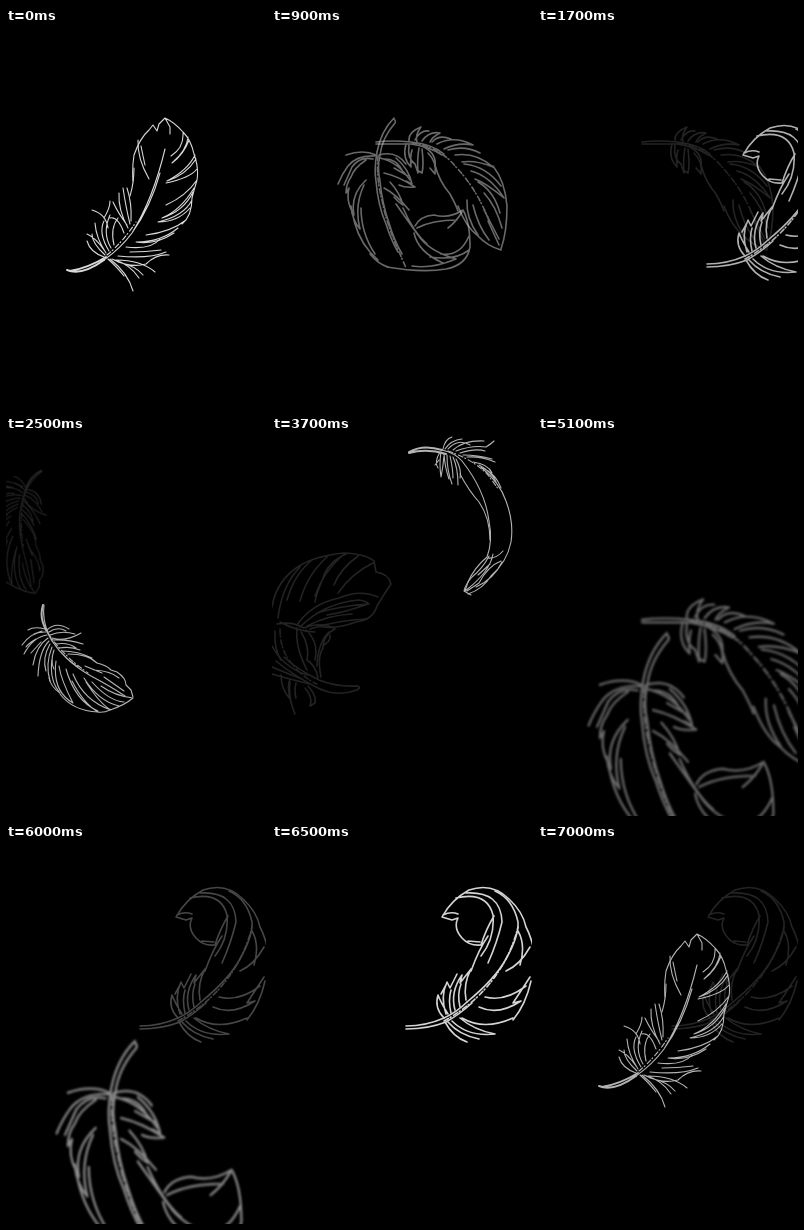
Recreate the animation shown at these times as an HTML page. Size 260x380 px, loop 7.1 s.

```html
<!DOCTYPE html>
<html lang="en">
<head>
<meta charset="utf-8">
<title>Falling feathers</title>
<style>
html, body { margin: 0; width: 100%; height: 100%; overflow: hidden; background: #000; }
svg { display: block; width: 100%; height: 100%; }
path { fill: none; stroke-linecap: round; stroke-linejoin: round; }
.fine { stroke: #d8d8d8; stroke-width: 1.1; filter: blur(.25px); }
.soft { stroke: #d4d4d4; stroke-width: 1.6; filter: blur(.75px); }
.quill { stroke-width: 2; }
.dots { stroke-dasharray: 5 2 1 3; }

/* Each pose fades in for 600 ms, then out for 600 ms, in 100 ms steps. */
.pose {
  opacity: 0;
  animation: fade 7100ms infinite steps(6);
  animation-delay: calc(var(--start) * 1ms - 7102ms);
}
@keyframes fade {
  0% { opacity: 0; }
  8.4507% { opacity: 1; }
  16.9014%, 100% { opacity: 0; }
}
/* These two pause part way through their shared cross-fade. */
.leaving { animation-name: leave; }
@keyframes leave {
  0% { opacity: 0; }
  8.4507% { opacity: 1; animation-timing-function: steps(2); }
  11.2676%, 18.3099% { opacity: .6667; animation-timing-function: steps(4); }
  23.9437%, 100% { opacity: 0; }
}
.arriving { animation-name: arrive; }
@keyframes arrive {
  0% { opacity: 0; animation-timing-function: steps(2); }
  2.8169%, 9.8592% { opacity: .3333; animation-timing-function: steps(4); }
  15.493% { opacity: 1; }
  23.9437%, 100% { opacity: 0; }
}
</style>
</head>
<body>
<svg viewBox="0 0 260 380">
<defs>
  <g id="upright" class="fine">
    <path class="quill" d="M61 242Q76 248 98 232M64 243Q82 240 100 229"/>
    <path d="M98 232Q115 220 126 205Q147 171 159 121M126 205Q145 178 154 145"/>
    <path class="dots" d="M101 227Q116 215 130 194"/>
    <path d="M127 153Q126 140 128 127Q134 110 143 102L147 97L151 103L153 96L159 90L164 99L164 106
      M159 90Q168 94 177 104Q185 112 188 126Q193 140 191 152Q188 162 186 170Q186 188 176 196
      M182 109Q181 122 166 135Q178 126 183 112M177 105Q178 120 165 128
      M189 127Q182 142 161 153Q180 147 190 131M191 141Q184 150 160 155
      M191 152Q180 168 160 177M188 160Q175 182 156 190Q178 183 187 164
      M186 172Q178 188 152 194Q172 194 184 180M180 192Q165 204 140 207
      M172 200Q155 214 130 214Q150 217 168 205"/>
    <path d="M154 211Q145 222 120 219M160 224Q143 231 112 228M155 222Q140 224 124 224
      M163 227Q150 226 140 236Q125 240 108 232M149 244Q135 232 110 232M133 250Q124 236 106 231
      M127 263Q122 245 104 231M118 248Q112 240 102 231M137 247Q130 238 112 234"/>
    <path d="M98 229Q84 224 81 213M99 227Q86 215 86 206M100 225Q90 210 89 195M103 223Q92 205 98 193
      M105 220Q96 205 104 187M81 206Q90 210 98 222M86 182Q100 186 102 200M98 190Q104 180 104 173
      M108 217Q104 200 112 190M122 200Q112 182 113 165M124 196Q120 180 117 160M125 193Q126 175 121 160
      M104 190Q112 188 118 205M107 174Q112 185 121 197"/>
    <path d="M132 112Q131 130 143 151M135 118Q137 128 139 137M128 140Q128 155 124 168"/>
  </g>

  <g id="hanging" class="soft">
    <path d="M122 90Q109 103 105 124Q102 140 104 153M122 91Q124 93 123 95Q110 110 108 127Q105 140 108 153
      Q110 175 117 195Q122 212 130 226M104 153Q106 178 114 196Q119 212 126 224"/>
    <path class="dots" d="M106 128Q104 150 110 172Q114 195 128 226L134 240"/>
    <path d="M104 127Q91 121 74 127M103 128Q85 127 76 138Q70 146 66 156M101 131Q88 128 80 139L72 157
      M94 132Q82 140 79 149Q74 156 74 165L77 160Q74 172 80 183
      M94 152Q78 167 82 187M92 157Q82 178 88 201Q80 192 79 178
      M80 183Q84 208 98 224L106 232M89 180Q89 205 103 226M98 226Q106 236 116 239"/>
    <path d="M107 127Q124 122 134 136M108 130Q126 134 138 152M113 131Q125 131 131 144
      M112 145Q126 148 143 159Q133 160 127 157M118 154Q128 165 131 177Q126 174 122 169
      M112 160Q124 166 137 182M124 130Q137 141 140 156L134 153M122 140L136 148"/>
    <path d="M124 176Q138 196 149 211Q160 224 184 231M131 180Q142 205 155 216
      M143 198Q148 188 162 187Q177 191 191 182Q198 194 198 219Q195 237 174 241Q150 245 115 239
      M145 200Q160 192 185 192M190 184Q184 194 176 200M197 208Q188 229 169 226
      M197 222Q183 233 158 229M142 205Q146 224 171 235M140 238Q160 241 184 231"/>
  </g>

  <g id="drifting" class="soft">
    <path d="M104 114Q120 112 139 114Q160 116 172 126M104 116Q122 116 139 116Q158 119 170 127"/>
    <path class="dots" d="M140 115Q168 119 184 139Q205 161 218 195"/>
    <path d="M137 113Q136 104 149 99Q143 107 145 114M143 112Q148 102 157 103M150 113Q157 103 168 105
      Q160 109 158 114M160 114Q167 106 179 111M165 116Q182 107 201 117Q186 114 172 121
      M176 122Q193 117 208 125M183 127Q204 124 221 139Q204 132 190 134M192 136Q214 138 229 158
      M199 143Q218 148 232 170Q214 155 203 151M206 154Q222 163 228 185M212 165Q224 178 230 200"/>
    <path d="M221 138Q233 153 235 178Q235 204 229 221M212 182L227 211"/>
    <path d="M134 116Q130 130 139 139Q138 129 140 122M137 117Q135 131 143 136L146 145Q145 131 147 120
      M150 121Q152 137 150 145L145 142M156 125Q165 134 163 146L158 140M152 119Q165 126 163 139"/>
    <path d="M163 137Q167 153 178 166Q184 177 186 183M186 178Q194 199 205 207Q215 218 229 222
      M201 177Q206 198 217 212M195 172Q194 190 206 207M216 193L227 217"/>
  </g>

  <g id="tilted" class="fine">
    <path class="quill" d="M37 169Q33 181 40 194"/>
    <path d="M38 169Q36 184 43 199Q55 223 85 240Q104 250 119 260M40 194Q50 216 72 231"/>
    <path class="dots" d="M42 197Q56 219 82 237"/>
    <path d="M41 194Q50 185 63 193M43 196Q52 190 60 195M44 199Q56 194 69 198M46 202Q60 206 75 197
      M47 204Q61 203 77 208M50 208Q62 206 70 212M53 212Q65 210 74 214M56 215Q72 215 86 222
      M62 218Q82 218 91 227Q100 229 105 234L111 236Q120 242 120 249L125 254L127 261"/>
    <path d="M39 193Q28 190 22 194M40 196Q26 195 16 209M41 199Q27 201 18 218M30 203Q23 207 20 211
      M42 202Q30 210 27 229M43 205Q33 215 32 240M44 208Q36 222 40 235M46 211Q39 228 44 245
      M36 195L28 198M35 206L25 217M48 214Q44 226 48 233"/>
    <path d="M46 224Q43 244 54 257Q45 251 43 242M50 225Q46 255 67 267Q55 244 53 230
      M54 258Q67 275 92 276Q78 268 66 245M60 233Q69 265 92 275M67 238Q78 265 105 274Q94 268 80 246
      M78 242Q92 265 113 270M86 246Q103 265 118 266M95 250Q109 260 127 262Q119 269 104 274Q98 277 91 276
      M79 230L96 237M88 234Q105 235 113 242M98 241L118 255"/>
  </g>

  <g id="dangling" class="fine">
    <path class="quill" d="M137 16Q151 8 170 14M137 17Q155 12 174 18"/>
    <path d="M170 14Q183 17 190 25Q213 54 217 85Q221 105 215 121Q202 132 196 146L193 155"/>
    <path class="dots" d="M176 15Q202 24 216 39L227 54"/>
    <path d="M209 31Q228 47 234 65Q242 86 239 106Q235 126 219 140Q211 153 196 158
      M188 38Q197 55 207 66Q218 82 218 104M217 120Q211 132 200 141Q193 149 192 155L199 159
      M221 118Q218 136 193 155M229 125Q216 130 207 147L195 155M230 126Q222 143 204 151
      M216 122Q224 123 231 115M218 128L206 139"/>
    <path d="M171 13Q173 3 180 1M173 13Q179 4 190 3M176 13Q186 2 198 9M181 14Q192 4 212 5
      M184 15Q200 9 214 11Q219 8 222 5M188 17Q204 12 213 15M191 19Q206 19 220 23M195 21Q209 20 223 26
      M201 26Q216 28 220 37M207 29Q220 36 224 46M211 32Q224 38 229 52"/>
    <path d="M168 16Q162 26 166 32M169 16Q167 28 169 41Q171 31 172 20M172 18Q173 32 177 43
      M175 19Q175 35 180 48M178 20Q181 33 181 42M181 21Q186 32 186 49M184 23Q190 34 188 42M167 24L163 29"/>
  </g>

  <g id="folded" class="soft">
    <path d="M86 250Q64 251 47 244Q23 232 12 221M85 254Q63 262 42 250Q18 237 4 225M86 250Q89 252 85 254"/>
    <path class="dots" d="M8 193Q8 212 17 224Q29 241 45 248"/>
    <path d="M0 171Q4 145 27 130Q43 120 72 117Q94 118 102 125L104 136Q117 138 119 148Q112 158 105 170
      Q101 184 84 186Q62 194 46 190M74 118Q56 126 51 142Q44 159 43 166M71 119Q51 136 43 160
      M55 121Q35 139 28 165M39 125Q22 139 15 164M28 131Q10 149 6 182
      M86 120Q68 133 62 149M101 127Q80 137 66 157"/>
    <path d="M25 189Q39 168 67 162Q88 153 106 161M28 191Q52 167 87 164Q94 165 97 168
      M45 177Q68 170 96 168Q74 176 55 179M35 190Q56 179 80 178M38 193Q66 184 95 183"/>
    <path d="M5 188Q20 185 32 192Q50 185 63 193M8 186Q24 195 43 196M29 196Q38 210 35 224Q44 230 46 242
      M34 194Q47 206 43 224M63 193Q51 199 51 212Q45 221 49 241M57 196Q46 206 45 230M25 192Q23 211 35 234
      M52 209Q59 205 58 199M3 195Q2 214 9 224"/>
    <path d="M0 210Q11 231 35 239M0 231Q14 237 30 243M0 238Q17 243 38 248M9 239Q9 253 18 263Q15 249 18 243
      M18 246Q16 262 23 278M24 247Q22 255 24 262M36 250Q45 260 43 267L38 270Q41 261 33 252"/>
  </g>

  <g id="curled" class="soft">
    <path d="M134 182Q154 182 172 174Q185 168 195 158M134 185Q156 185 174 178Q188 170 200 159"/>
    <path d="M195 158Q223 135 234 115Q247 92 246 78Q241 55 223 47"/>
    <path class="dots" d="M172 177Q203 160 222 134Q239 111 246 83"/>
    <path d="M170 73Q179 56 197 46Q220 38 237 55Q251 68 254 83Q260 94 263 112
      M170 73L180 76L186 74Q181 84 190 94Q197 102 209 101Q214 85 222 72
      M171 71Q179 67 186 70M184 54Q215 47 221 71Q223 94 209 112
      M194 49Q229 47 230 78Q225 99 216 119M216 92Q207 105 199 127M196 97L208 98"/>
    <path d="M172 174Q162 164 166 151Q169 159 176 170M174 170Q168 153 175 138L178 144L185 130
      M179 169Q176 156 179 146M183 166Q178 148 190 131L188 139L199 125Q191 140 194 156
      M188 163Q185 150 189 140M169 150L174 141"/>
    <path d="M173 178Q181 193 195 198M176 178Q187 191 207 195M180 177Q196 193 223 190Q202 186 188 174
      M190 174Q212 187 241 174M207 163Q226 172 249 157L241 159L258 133
      M213 153Q233 158 254 142M234 127Q248 121 258 103M241 176Q254 160 259 137
      M246 87Q254 101 248 121"/>
  </g>
</defs>

<use class="pose" href="#upright" style="--start: 6500"/>
<use class="pose" href="#hanging" style="--start: 0"/>
<use class="pose" href="#drifting" style="--start: 600"/>
<use class="pose" href="#curled" style="--start: 1200" transform="translate(35 54)"/>
<use class="pose" href="#tilted" style="--start: 1800"/>
<use class="pose" href="#tilted" style="--start: 2400" transform="translate(36 34) rotate(47) scale(.95) translate(-37 -168)"/>
<use class="pose" href="#dangling" style="--start: 3000"/>
<use class="pose" href="#folded" style="--start: 3600"/>
<use class="pose" href="#drifting" style="--start: 4200" transform="translate(104 185) scale(1.36) translate(-104 -115)"/>
<use class="pose leaving" href="#hanging" style="--start: 4800" transform="translate(129 197) scale(1.4) translate(-122 -90)"/>
<use class="pose arriving" href="#curled" style="--start: 5400"/>
</svg>
</body>
</html>
```
